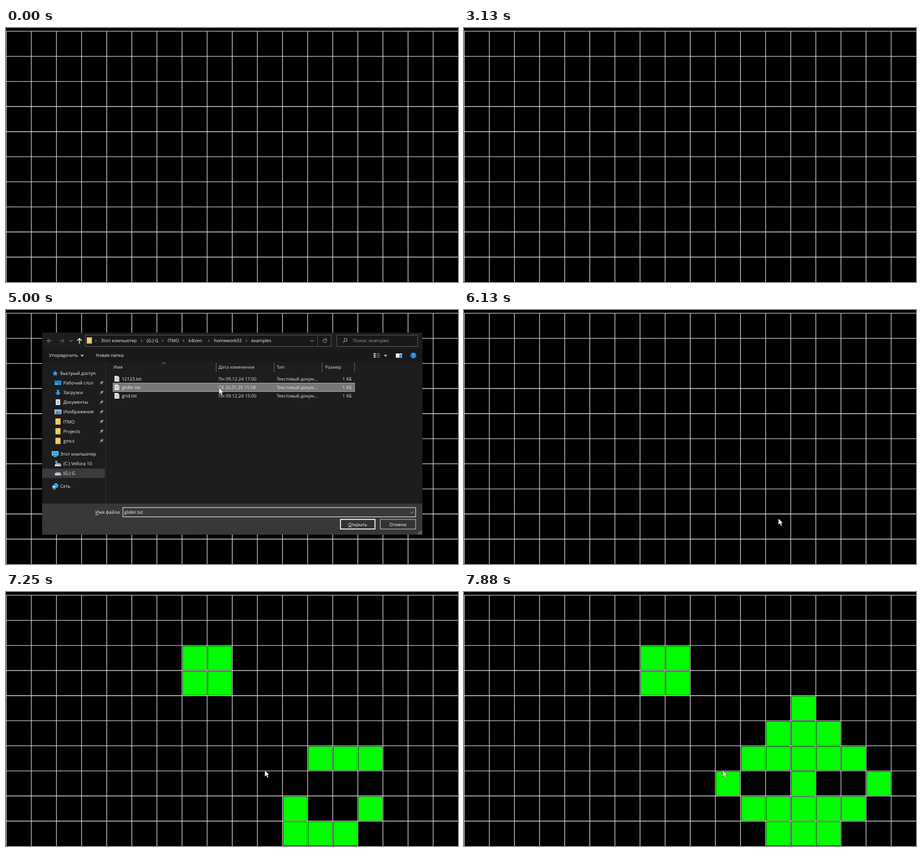
An HTML page that plays this animation: 800 px wide and 450 px high, repeating every 8000 ms.

```html
<!DOCTYPE html>
<html lang="ru">
<head>
<meta charset="utf-8">
<title>Game of Life</title>
<style>
  html, body { margin: 0; width: 100%; height: 100%; overflow: hidden; background: #000; }
  svg { display: block; width: 800px; height: 450px; }
  text { font: 8px "Open Sans", "Noto Sans", sans-serif; white-space: pre; text-rendering: geometricPrecision; }
</style>
</head>
<body>
<svg id="stage" viewBox="0 0 800 450"></svg>
<script>
const LOOP = 8000, STEP = 125;
const PITCH = 44.45, LEFT = 0.4, TOP = 5.8, COLS = 18, ROWS = 10;
const LIFE_START = 7225, LIFE_STEP = 100, LAST_GENERATION = 6;
const DIALOG_OPEN = 27, CRUMB_LEFT = 34, FILE_CLICKED = 37, DIALOG_CLOSED = 48;

// Markup helpers
const rect = (x, y, w, h, fill, stroke = 'none', sw = 1) =>
  `<rect x="${x}" y="${y}" width="${w}" height="${h}" fill="${fill}" stroke="${stroke}" stroke-width="${sw}"/>`;
const path = (d, stroke, fill = 'none', sw = 1) =>
  `<path d="${d}" stroke="${stroke}" fill="${fill}" stroke-width="${sw}"/>`;
const text = (x, middle, s, fill = '#f4f4f4', anchor = 'start') =>
  `<text x="${x}" y="${middle + 2.9}" fill="${fill}" text-anchor="${anchor}">${s}</text>`;
const at = (x, y, content) => `<g transform="translate(${x} ${y})">${content}</g>`;
const chevron = (x, y, c = '#bbb') => path(`M${x - 1} ${y - 2}l2 2l-2 2`, c, 'none', 0.9);
const chevronDown = (x, y) => path(`M${x - 3} ${y - 1.5}l3 3l3 -3`, '#bbb', 'none', 0.9);

function gridLines() {
  let d = '';
  for (let c = 0; c < COLS; c++) d += `M${LEFT + c * PITCH} ${TOP}V450`;
  for (let r = 0; r < ROWS; r++) d += `M0 ${TOP + r * PITCH}H800`;
  return path(d, '#e4e4e4', 'none', 1.1);
}

// Icons are centred on 0,0
const icon = {
  star: path('M0 -5L1.5 -1.6L5 -1.2L2.4 1.2L3.1 4.8L0 3L-3.1 4.8L-2.4 1.2L-5 -1.2L-1.5 -1.6Z', 'none', '#3f9ce8'),
  desktop: rect(-6, -4, 12, 8, '#1389dc') + rect(-5, 1.5, 4, 1.3, '#8fd0ff'),
  down: path('M-1.8 -5H1.8V0H5L0 5L-5 0H-1.8Z', 'none', '#3b9cec'),
  page: rect(-4, -5, 8, 10, '#e9eef3') + path('M-2.5 -2H2.5M-2.5 0H2.5M-2.5 2H2.5', '#4b8cc4', 'none', 0.8),
  picture: rect(-6, -4, 12, 8, '#eef5fa') + rect(-5, -3, 10, 6, '#58aee6') + path('M-5 3L-1 0L2 2L5 0V3Z', 'none', '#2d6d8e'),
  folder: rect(-4.5, -5.5, 9, 11, '#f5cf62') + path('M1.5 5.5V2.5H4.5', '#d9a93a', 'none', 0.8),
  computer: rect(-5.5, -4.5, 11, 7, '#32a9ee', '#a9dcf8', 0.8) + path('M-3 4.5H3', '#b9cbd6', 'none', 1.4),
  drive: path('M-5.5 1L-3.5 -2H3.5L5.5 1Z', 'none', '#8e9296') + rect(-5.5, 0.5, 11, 3.5, '#d2d5d7') + rect(2.5, 1.8, 1.8, 1, '#3d8a4a'),
  network: `<circle cx="1.5" cy="-1" r="4.3" fill="#3d9ee0"/>` + rect(-5, -1, 6, 4.5, '#9bd6f4', '#2974a9', 0.8) + path('M-4 5H1', '#cfdde6'),
  pin: `<g transform="rotate(45)">${rect(-1.5, -3.5, 3, 3.5, '#9b9b9b')}${path('M-2.8 .5H2.8M0 .5V4', '#9b9b9b', 'none', 1)}</g>`,
  file: path('M-4 -5H2L4.5 -2.5V5H-4Z', 'none', '#e6e6e6') + path('M-2.5 -2H2.5M-2.5 0H3M-2.5 2H3', '#9a9a9a', 'none', 0.7),
};

function addressBar() {
  const crumbs = [[168, 'Этот компьютер'], [249, '(G:) G'], [286, 'ITMO'], [323, 'k4lzen'], [368, 'homework03'], [434, 'examples']];
  return path('M81.5 54.5H73M77 50.5L73 54.5L77 58.5', '#8e8e8e') +
    path('M94.5 54.5H103M99 50.5L103 54.5L99 58.5', '#777') +
    chevronDown(115, 54.5) +
    path('M130 59.5V50.5M126 54.5L130 50.5L134 54.5', '#fff', 'none', 1.3) +
    rect(140.5, 44.5, 435, 20, '#191919', '#565656') +
    `<g id="crumbHover">${rect(365, 45, 66, 19, '#3a3a3a')}${path('M421.5 45V64', '#555')}</g>` +
    at(147.5, 54, icon.folder) +
    [159, 240, 277, 314, 359, 425.5].map(x => chevron(x, 54.5)).join('') +
    crumbs.map(([x, s]) => text(x, 54.5, s)).join('') +
    chevronDown(541.5, 54.5) + path('M551.5 45V64', '#444') +
    path('M567 52.5A3.3 3.3 0 1 1 564 51.2M565 49L567.3 52.4L563.4 53', '#aaa', 'none', 0.9) +
    rect(585.5, 44.5, 143, 20, '#191919', '#565656') +
    `<circle cx="601" cy="53" r="2.7" fill="none" stroke="#aaa"/>` + path('M599 55L596 58.5', '#aaa') +
    text(614, 54.5, 'Поиск: examples', '#9d9d9d');
}

function toolbar() {
  return text(76, 80.5, 'Упорядочить') + path('M131.5 79.5H138L134.7 82.8Z', 'none', '#ccc') +
    text(159, 80.5, 'Новая папка') +
    [77.5, 80.5, 83.5].map(y => rect(650.5, y - 1, 4, 1.8, '#d8d8d8') + rect(656, y - .6, 6, 1, '#999')).join('') +
    path('M668.5 79.5H675L671.7 82.8Z', 'none', '#ccc') +
    rect(690, 77, 11, 7.5, '#f1f1f1') + rect(696, 78.5, 4.5, 5.5, '#2f8fd8') +
    `<circle cx="721" cy="80.5" r="5.3" fill="#1683d8"/>` + text(721, 80.5, '?', '#fff', 'middle');
}

function sidebar() {
  const pinned = [['desktop', 'Рабочий стол'], ['down', 'Загрузки'], ['page', 'Документы'], ['picture', 'Изображения'],
    ['folder', 'ITMO'], ['folder', 'Projects'], ['folder', 'gmcs']];
  return rect(64, 281, 111, 16.5, '#3b3b3d') +
    at(87, 112, icon.star) + text(96, 112, 'Быстрый доступ') +
    pinned.map(([name, label], i) => {
      const y = 129 + i * 17.15;
      return at(92, y, icon[name]) + text(101.5, y, label) + at(169, y, icon.pin);
    }).join('') +
    at(87, 255, icon.computer) + text(96, 255, 'Этот компьютер') +
    at(92, 273, icon.drive) + rect(87, 267, 4, 4, '#2aa4e8') + text(101.5, 272, '(C:) Vellora 10') +
    at(92, 289, icon.drive) + text(101.5, 289, '(G:) G') +
    at(87, 312, icon.network) + text(96, 312, 'Сеть') +
    path('M176.5 93V343', '#303030');
}

function fileList() {
  const headers = [[190, 'Имя'], [376, 'Дата изменения'], [479, 'Тип'], [565, 'Размер']];
  const files = [['12123.txt', 'Пн 09.12.24 17:00'], ['glider.txt', 'Сб 25.01.25 11:58'], ['grid.txt', 'Пн 09.12.24 15:00']];
  return path('M276 95.5L279 92.5L282 95.5', '#aaa', 'none', 0.9) +
    headers.map(([x, s]) => text(x, 101, s, '#dedede')).join('') +
    path([372, 474.5, 559.5, 617].map(x => `M${x} 93V110`).join(''), '#6b6b6b') +
    `<rect id="selection" x="189.5" y="129.5" width="427.5" height="15"/>` +
    files.map(([name, date], i) => {
      const y = 121.7 + i * 15.2;
      return at(196, y, icon.file) + text(205, y, name) + text(376, y, date, '#e4e4e4') +
        text(479, y, 'Текстовый докум...', '#e4e4e4') + text(612, y, '1 КБ', '#e4e4e4', 'end');
    }).join('');
}

function footer() {
  let grip = '';
  for (let i = 0; i < 3; i++)
    for (let j = 0; j <= i; j++) grip += rect(734 - j * 2.3, 391 + i * 2.3, 1.3, 1.3, '#bbb');
  const underlined = (first, rest) => `<tspan text-decoration="underline">${first}</tspan>${rest}`;
  return rect(64, 343, 673, 55, '#38383a') +
    text(203, 358.3, underlined('И', 'мя файла:'), '#f4f4f4', 'end') +
    rect(207, 350, 518, 16.5, '#3a3a3c', '#f0f0f0') +
    path('M210 353V363.5', '#fff', 'none', 0.8) +
    `<g id="fileName">${rect(209, 352, 4, 13, '#3a3a3c')}${text(209.5, 358.3, 'glider.txt')}</g>` +
    chevronDown(718.5, 358.5) +
    rect(592, 371, 61, 17, '#333', '#fff', 1.6) + text(622.5, 379.7, underlined('О', 'ткрыть'), '#fff', 'middle') +
    rect(662.5, 371, 62.5, 17, '#333', '#c4c4c4', 1) + text(693.5, 379.7, 'Отмена', '#fff', 'middle') + grip;
}

const stage = document.getElementById('stage');
stage.innerHTML = rect(0, 0, 800, 450, '#000') + gridLines() + '<g id="cells"></g>' +
  `<g id="dialog">${rect(64, 40, 673, 358, '#1d1c1f')}${rect(64, 68, 673, 25, '#19191b')}` +
  addressBar() + toolbar() + sidebar() + fileList() + footer() + '</g>' +
  `<g id="cursor">${path('M0 0V11L2.6 8.7L4.6 13L6.5 12.2L4.6 8H8Z', '#222', '#fff', 0.5)}</g>`;
const [cells, dialog, crumbHover, selection, fileName, cursor] =
  ['cells', 'dialog', 'crumbHover', 'selection', 'fileName', 'cursor'].map(id => document.getElementById(id));

// Conway's rules on a bounded board
const key = (r, c) => r * COLS + c;
const seed = { 2: [7, 8], 3: [7, 8], 6: [12, 13, 14], 8: [11, 14], 9: [11, 12, 13] };
const generations = [new Set(Object.entries(seed).flatMap(([r, cs]) => cs.map(c => key(+r, c))))];

function nextGeneration(alive) {
  const next = new Set();
  for (let r = 0; r < ROWS; r++) for (let c = 0; c < COLS; c++) {
    let n = 0;
    for (let y = Math.max(r - 1, 0); y <= Math.min(r + 1, ROWS - 1); y++)
      for (let x = Math.max(c - 1, 0); x <= Math.min(c + 1, COLS - 1); x++)
        if ((y !== r || x !== c) && alive.has(key(y, x))) n++;
    if (n === 3 || (n === 2 && alive.has(key(r, c)))) next.add(key(r, c));
  }
  return next;
}
while (generations.length <= LAST_GENERATION) generations.push(nextGeneration(generations.at(-1)));

const cellMarkup = generations.map(alive => [...alive].map(k =>
  rect(LEFT + (k % COLS) * PITCH + 1.4, TOP + Math.floor(k / COLS) * PITCH + 1.4, 42, 42, '#0f0')).join(''));

// Pointer keys: tick, x, y; a negative x hides it
const pointer = [
  [0, -20, 0], [1, 438, 54], [2, 364, 240], [3, 364, 240], [5, 362, 248], [10, 330, 150], [13, 253, 300],
  [14, 271, 309], [15, 271, 309], [16, 438, 54], [17, 271, 312], [18, 271, 312], [19, 264, 304],
  [20, 271, 312], [22, 271, 312], [24, 280, 85], [25, -20, 0], [27, -20, 0], [28, 430, 437], [33, 405, 46],
  [37, 377, 138], [40, 377, 138], [43, 612, 368], [45, 612, 368], [46, 614, 377], [48, 590, 437],
  [50, 523, 302], [58, 458, 316], [64, 458, 316],
];

function pointerAt(tick) {
  const i = pointer.findIndex(k => k[0] > tick);
  const [t0, x0, y0] = pointer[i - 1], [t1, x1, y1] = pointer[i];
  const p = (tick - t0) / (t1 - t0);
  return [x0 + (x1 - x0) * p, y0 + (y1 - y0) * p];
}

const show = (el, on) => el.setAttribute('visibility', on ? 'inherit' : 'hidden');

function draw(time) {
  const tick = Math.floor(time / STEP), now = tick * STEP;
  dialog.setAttribute('visibility', tick >= DIALOG_OPEN && tick < DIALOG_CLOSED ? 'visible' : 'hidden');
  show(crumbHover, tick < CRUMB_LEFT);
  show(selection, tick >= FILE_CLICKED - 1);
  show(fileName, tick >= FILE_CLICKED);
  selection.setAttribute('fill', tick < FILE_CLICKED ? '#4d4d4d' : '#777');
  selection.setAttribute('stroke', tick >= FILE_CLICKED && tick < 41 ? '#a5a5a5' : 'none');
  const generation = Math.min(Math.floor((now - LIFE_START) / LIFE_STEP), LAST_GENERATION);
  cells.innerHTML = cellMarkup[generation] || '';
  cursor.setAttribute('transform', `translate(${pointerAt(tick)})`);
}

let lastTick = -1;
function loop() {
  const time = performance.now() % LOOP, tick = Math.floor(time / STEP);
  if (tick !== lastTick) draw(time);
  lastTick = tick;
  requestAnimationFrame(loop);
}
loop();
</script>
</body>
</html>
```
